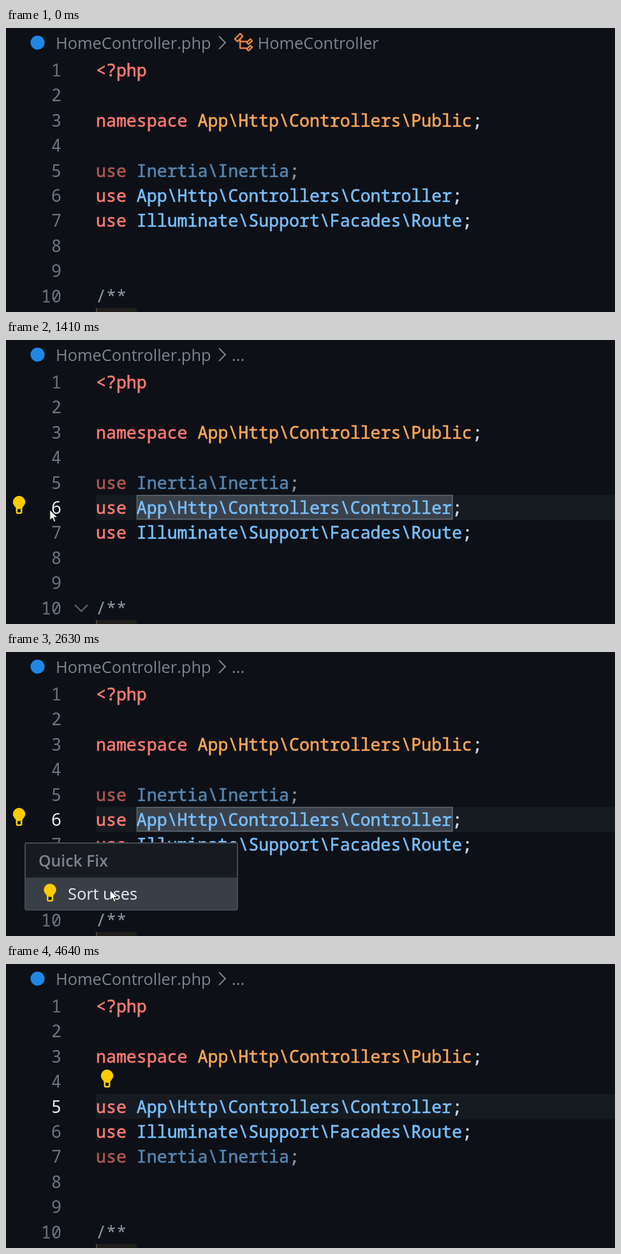
Animation of 955 by 446 pixels, one loop 5100 ms. Source, as an HTML page:

```html
<!DOCTYPE html>
<html lang="en">
<head>
<meta charset="utf-8">
<title>Sort uses</title>
<style>
  html, body { margin: 0; width: 100%; height: 100%; overflow: hidden; background: #0d1117; }
  svg { display: block; }
  text { font: 26.58px "Noto Sans Mono", "DejaVu Sans Mono", monospace; white-space: pre; }
  tspan { fill: var(--ink); stroke: var(--ink); stroke-width: .6; }
  .ui { font: 25.35px "Open Sans", "Noto Sans", sans-serif; fill: #7d848e; }
  .num { fill: #6e7681; text-anchor: end; }
  .active { fill: #e6edf3; }
  .kw { --ink: #ff7b72; }
  .ns { --ink: #ffa657; }
  .cls { --ink: #79c0ff; }
  .end { --ink: #c9d9e9; }
  .rem { --ink: #8b949e; stroke-width: .2; }
  .unused { opacity: .667; }
  .line { fill: none; stroke: #7d848e; stroke-width: 2; }
</style>
</head>
<body>
<svg width="955" height="446" viewBox="0 0 955 446">
  <defs>
    <g id="bulb">
      <path fill="#ffcc00" d="M-5 18V9.5C-5 7-9.7 4.5-9.7-.5a9.7 9.7 0 0 1 19.4 0C9.7 4.5 5 7 5 9.5V15Q5 18 2 18H-2Q-5 18-5 15Z"/>
      <path fill="#0d1117" d="M-2.5 10.5H2.5V15.5H-2.5Z"/>
    </g>
  </defs>

  <rect id="current" x="141" width="814" height="39.4" fill="#161b22"/>
  <rect id="word" x="205.5" y="244" width="494.5" height="37.5" fill="#3a414b" stroke="#626a74" stroke-width="1.5"/>
  <path fill="#211f1b" d="M141 440h64v6h-64z"/>
  <path fill="#55554f" d="M141 440h1.5v6h-1.5z"/>

  <circle cx="49.5" cy="23" r="11" fill="#1e88e5"/>
  <text class="ui" x="78" y="33">HomeController.php</text>
  <path class="line" d="M334 13l10 10-10 10"/>
  <g id="symbol">
    <path transform="translate(356 6) scale(2.08)" fill="#f0883e" stroke="#f0883e" stroke-width=".2" fill-rule="evenodd" d="M11.34 9.71h.71l2.67-2.67v-.71L13.38 5h-.7l-1.82 1.81h-5V5.56l1.86-1.85V3l-2-2H5L1 5v.71l2 2h.71l1.14-1.15v5.79l.5.5H10v.52l1.33 1.34h.71l2.67-2.67v-.71L13.37 10h-.7l-1.86 1.85h-5v-4H10v.48zM13.03 6.06l.63.63-2 2-.63-.63zM13.03 11.06l.63.63-2 2-.63-.63zM3.35 6.65l-1.29-1.3 3.29-3.29 1.3 1.29z"/>
    <text class="ui" x="394.5" y="33">HomeController</text>
  </g>
  <text class="ui" id="dots" x="354" y="33">...</text>

  <g id="code"></g>
  <path class="line" id="fold" d="M108 416l10 10 10-10"/>
  <rect id="caret" x="284" width="4" height="39.4" fill="#388bfd"/>
  <use id="hint" href="#bulb"/>

  <g id="popup">
    <rect x="30" y="300" width="333" height="105" rx="3" fill="#171b21"/>
    <rect id="hover" x="30" y="355" width="333" height="50" fill="#393f47"/>
    <path d="M30 354.5H363" stroke="#30363d"/>
    <rect x="30" y="300" width="333" height="105" rx="3" fill="none" stroke="#454b52" stroke-width="2"/>
    <text class="ui" x="51" y="337" style="font-weight:600;font-size:24.8px">Quick Fix</text>
    <use href="#bulb" x="69" y="374"/>
    <text class="ui active" x="97" y="389">Sort uses</text>
  </g>

  <g id="mouse">
    <circle id="press" cx="-2" cy="-1" r="12" fill="#f5e80a" opacity=".52"/>
    <path id="arrow" d="M0 0V16L4 12.5L6.5 18.5L9 17.5L6.5 11.5H12Z" fill="#fff" stroke="#111"/>
    <path id="beam" d="M-4-9H-1L0-8L1-9H4M0-8V8M-4 9H-1L0 8L1 9H4" fill="none" stroke="#d4d4d4" stroke-width="1.2"/>
  </g>
</svg>
<script>
const LOOP = 5100, PITCH = 39.4;
const el = id => document.getElementById(id);
const show = (id, on) => { el(id).style.display = on ? '' : 'none'; };
const rowY = i => 76 + i * PITCH;
const rowTop = i => 46.3 + i * PITCH;

const span = (cls, text) => `<tspan class="${cls}">${text}</tspan>`;
const statement = (word, cls, path) => span('kw', word + ' ') + span(cls, path) + span('end', ';');
const lines = [
  span('kw', '&lt;?php'), '',
  statement('namespace', 'ns', 'App\\Http\\Controllers\\Public'), '',
  statement('use', 'cls', 'Inertia\\Inertia'),
  statement('use', 'cls', 'App\\Http\\Controllers\\Controller'),
  statement('use', 'cls', 'Illuminate\\Support\\Facades\\Route'),
  '', '',
  span('rem', '/**')
];
el('code').innerHTML = lines.map((line, i) =>
  `<text class="num" id="n${i}" x="87" y="${rowY(i)}">${i + 1}</text>` +
  `<text id="l${i}" class="${i === 4 ? 'unused' : ''}" x="141" y="${rowY(i)}">${line}</text>`).join('');

// time, x, y
const path = [
  [40, 419, 417], [150, 385, 372], [300, 305, 278], [470, 282, 255],
  [1200, 282, 255], [1290, 170, 262], [1410, 69, 267], [1560, 40, 262], [1700, 31, 260],
  [2190, 31, 260], [2320, 85, 312], [2480, 155, 358], [2630, 163, 374],
  [3650, 163, 375], [3780, 250, 400], [3960, 455, 450]
];
const presses = [[670, 850], [1730, 2030], [3020, 3180]];
const blinks = [[740, 1240], [1740, 1850], [3180, 3650], [4160, 4640]];

const within = (t, a, b) => t >= a && t < b;
const during = (t, spans) => spans.some(([a, b]) => within(t, a, b));
const ramp = (t, a, b) => Math.min(1, Math.max(0, (t - a) / (b - a)));

function mouseAt(t) {
  const i = Math.max(1, path.findIndex(p => p[0] > t));
  const [a, b] = [path[i - 1], path[i]];
  const k = ramp(t, a[0], b[0]);
  return [a[1] + (b[1] - a[1]) * k, a[2] + (b[2] - a[2]) * k];
}

function draw(t) {
  const clicked = t >= 740, sorted = t >= 3210, popup = within(t, 1850, 3090);
  const row = sorted ? 4 : 5;

  show('current', clicked);
  el('current').setAttribute('y', rowTop(row));
  show('word', within(t, 960, 3210));
  show('symbol', t < 900);
  show('dots', t >= 900);
  lines.forEach((_, i) => el('n' + i).classList.toggle('active', clicked && i === row));

  const order = sorted ? [6, 4, 5] : [4, 5, 6];
  order.forEach((place, i) => el('l' + (4 + i)).setAttribute('y', rowY(place)));

  show('caret', during(t, blinks));
  el('caret').setAttribute('y', rowTop(row));
  show('hint', t >= 1100);
  el('hint').setAttribute('transform', sorted ? 'translate(158.5 176)' : 'translate(20.5 255)');
  el('fold').style.opacity = t < 2030 ? ramp(t, 1330, 1400) * .75 * (1 - .85 * ramp(t, 1730, 1930)) : 0;

  show('popup', popup);
  show('hover', !within(t, 2300, 2520));

  const [x, y] = mouseAt(t);
  const arrow = popup || x < 140;
  show('mouse', within(t, 40, 3960));
  el('mouse').setAttribute('transform', `translate(${x} ${y})`);
  show('press', during(t, presses));
  show('arrow', arrow);
  show('beam', !arrow);
}

const start = performance.now();
function tick() {
  draw((performance.now() - start) % LOOP);
  requestAnimationFrame(tick);
}
tick();
</script>
</body>
</html>
```
